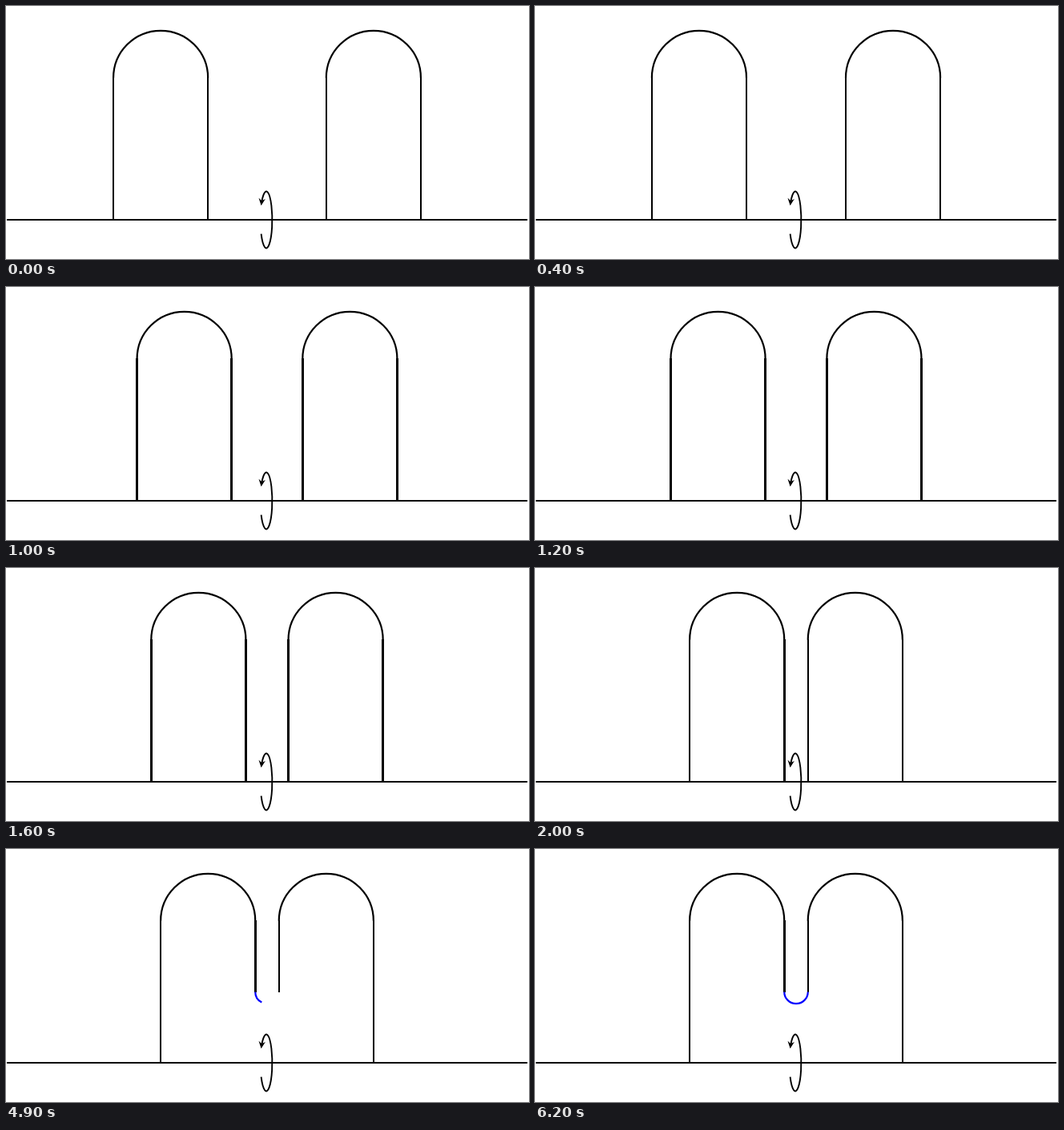
An HTML page with a canvas for the animation above (7400 ms loop, 653 by 316 pixels).

```html
<!DOCTYPE html>
<html lang="en">
<head>
<meta charset="utf-8">
<style>
html, body { margin: 0; width: 100%; height: 100%; overflow: hidden; background: #fff; }
canvas { display: block; }
</style>
</head>
<body>
<canvas id="stage" width="653" height="316"></canvas>
<script>
const ctx = document.getElementById('stage').getContext('2d');
const LOOP = 7400, TICK = 100, STEPS = 20;
const UNIT = 29.528, MID = 326, AXIS = 267;
const SHOULDER = AXIS - 6 * UNIT, JOIN = AXIS - 3 * UNIT;

const clamp = v => Math.max(0, Math.min(1, v));

// Straight lines fill every pixel they touch.
function vertical(x, bottom) {
  const left = Math.floor(x - 0.72), right = Math.ceil(x + 0.78);
  const top = Math.floor(SHOULDER);
  ctx.fillRect(left, top, right - left, Math.ceil(bottom) - top);
}

function arc(x, y, r, from, to, anticlockwise, color) {
  ctx.beginPath();
  ctx.arc(x, y, r, from, to, anticlockwise);
  ctx.strokeStyle = color;
  ctx.lineWidth = 2.2;
  ctx.stroke();
}

function arch(side, offset, innerBottom) {
  const x = MID + side * offset, r = 2 * UNIT;
  vertical(x + side * r, AXIS);
  vertical(x - side * r, innerBottom);
  arc(x, SHOULDER, r, Math.PI, 0, false, '#000');
}

function rotationArrow() {
  const deg = Math.PI / 180;
  ctx.beginPath();
  ctx.ellipse(325, AXIS, 0.25 * UNIT, 1.2 * UNIT, 0, 150 * deg, -140 * deg, true);
  ctx.strokeStyle = '#000';
  ctx.lineWidth = 1.9;
  ctx.stroke();

  ctx.save();
  ctx.translate(318.6, 249.3);
  ctx.rotate(7 * deg);
  ctx.beginPath();
  ctx.moveTo(0, 0);
  ctx.lineTo(-4.2, -9);
  ctx.lineTo(0, -6);
  ctx.lineTo(4.2, -9);
  ctx.fill();
  ctx.restore();
}

function draw(time) {
  const tick = Math.floor((time % LOOP) / TICK);
  // Each phase has 21 ticks: its starting pose and 20 steps.
  const [slide, retract, bridge] = [0, 1, 2].map(
    phase => clamp((tick - phase * (STEPS + 1)) / STEPS));

  ctx.fillStyle = '#fff';
  ctx.fillRect(0, 0, 653, 316);
  ctx.fillStyle = '#000';
  ctx.fillRect(1, AXIS - 1, 650, 2);

  const offset = (4.5 - 2 * slide) * UNIT;
  const innerBottom = AXIS + (JOIN - AXIS) * retract;
  arch(-1, offset, innerBottom);
  arch(1, offset, innerBottom);
  rotationArrow();
  if (bridge > 0) {
    arc(MID, JOIN, UNIT / 2, Math.PI, Math.PI * (1 - bridge), true, '#00f');
  }
}

const start = performance.now();
function frame() {
  draw(performance.now() - start);
  requestAnimationFrame(frame);
}
frame();
</script>
</body>
</html>
```
